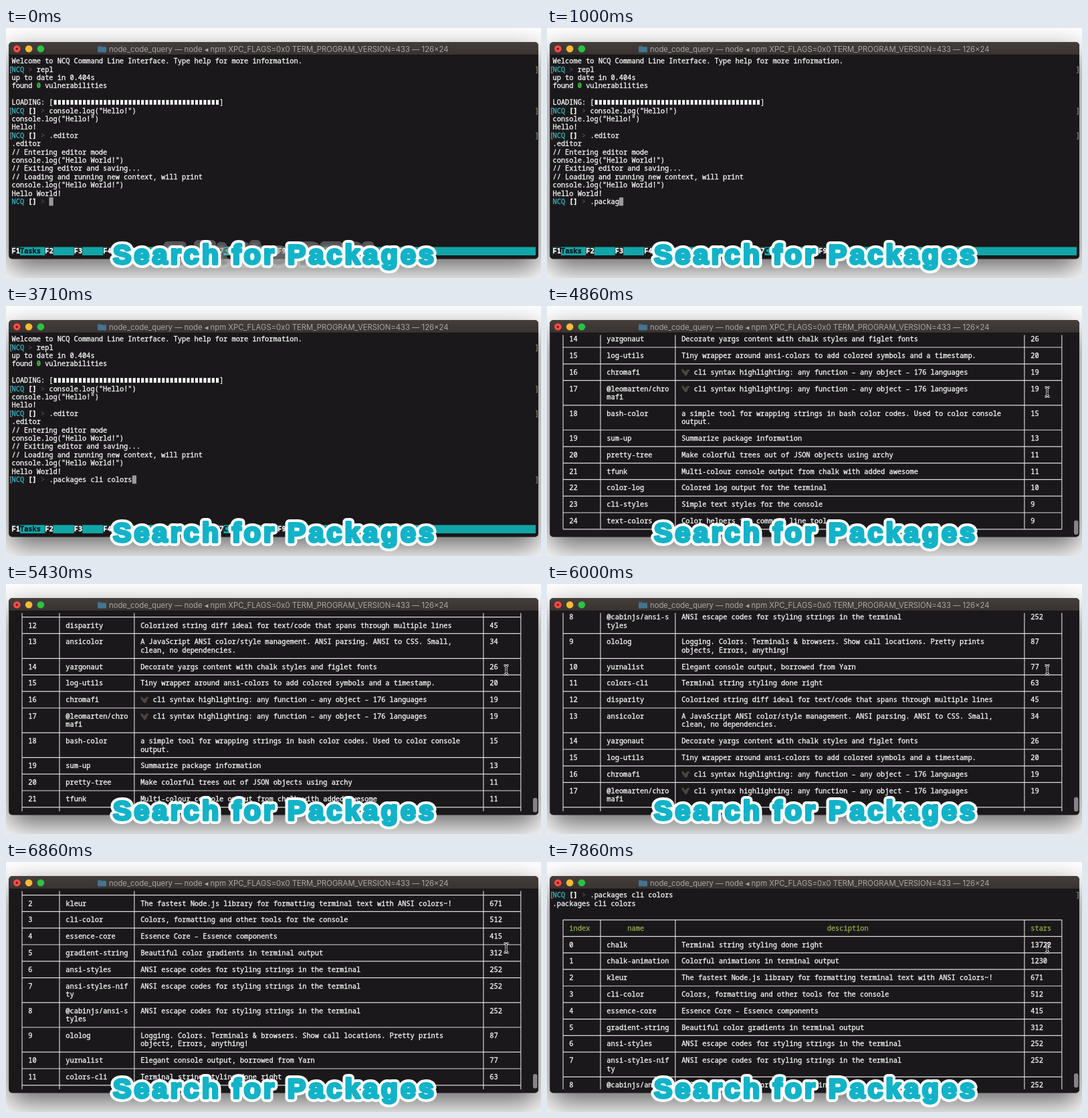
Recreate the animation shown at these times as an HTML page with a canvas. Size 800 px wide and 375 px high, loop 8 s.

```html
<!DOCTYPE html>
<html lang="en">
<head>
<meta charset="utf-8">
<title>Terminal package search</title>
<style>
  html, body { margin: 0; width: 100%; height: 100%; overflow: hidden; background: #fff; }
  canvas { display: block; }
</style>
</head>
<body>
<canvas id="stage" width="800" height="375"></canvas>
<script>
const ctx = document.getElementById('stage').getContext('2d');
const LOOP = 8000, FRAME = 1000 / 7;
const LEFT = 8.5, COL = 6.215, TOP = 49.6, ROW = 12.4, SCREEN_LINES = 24;
const WHITE = '#f8f8f8', CYAN = '#37b6c0', TEAL = '#12a5a8', DIM = '#4c4a4c', BACK = '#1a181a', GREEN = '#8fae4a';
const COMMAND = '.packages cli colors';
const BORDERS = [2, 11, 29, 113, 122].map(c => colX(c + 0.5));

// index order; "|" marks a wrapped line: name, description, stars
const PACKAGES = [
  ['chalk', 'Terminal string styling done right', 13722],
  ['chalk-animation', 'Colorful animations in terminal output', 1230],
  ['kleur', 'The fastest Node.js library for formatting terminal text with ANSI colors~!', 671],
  ['cli-color', 'Colors, formatting and other tools for the console', 512],
  ['essence-core', 'Essence Core – Essence components', 415],
  ['gradient-string', 'Beautiful color gradients in terminal output', 312],
  ['ansi-styles', 'ANSI escape codes for styling strings in the terminal', 252],
  ['ansi-styles-nif|ty', 'ANSI escape codes for styling strings in the terminal', 252],
  ['@cabinjs/ansi-s|tyles', 'ANSI escape codes for styling strings in the terminal', 252],
  ['ololog', 'Logging. Colors. Terminals & browsers. Show call locations. Pretty prints|objects, Errors, anything!', 87],
  ['yurnalist', 'Elegant console output, borrowed from Yarn', 77],
  ['colors-cli', 'Terminal string styling done right', 63],
  ['disparity', 'Colorized string diff ideal for text/code that spans through multiple lines', 45],
  ['ansicolor', 'A JavaScript ANSI color/style management. ANSI parsing. ANSI to CSS. Small,|clean, no dependencies.', 34],
  ['yargonaut', 'Decorate yargs content with chalk styles and figlet fonts', 26],
  ['log-utils', 'Tiny wrapper around ansi-colors to add colored symbols and a timestamp.', 20],
  ['chromafi', '   cli syntax highlighting: any function – any object – 176 languages', 19],
  ['@leomarten/chro|mafi', '   cli syntax highlighting: any function – any object – 176 languages', 19],
  ['bash-color', 'a simple tool for wrapping strings in bash color codes. Used to color console|output.', 15],
  ['sum-up', 'Summarize package information', 13],
  ['pretty-tree', 'Make colorful trees out of JSON objects using archy', 11],
  ['tfunk', 'Multi-colour console output from chalk with added awesome', 11],
  ['color-log', 'Colored log output for the terminal', 10],
  ['cli-styles', 'Simple text styles for the console', 9],
  ['text-colors', 'Color helpers for command line tools', 9],
];

function colX(col) { return LEFT + col * COL; }
function lineY(line) { return TOP + line * ROW; }

// The hairline stroke gives the text its medium weight.
function mono(text, col, line, color = WHITE, weight = 500) {
  ctx.font = `${weight} ${COL / 0.6}px "Noto Sans Mono", "DejaVu Sans Mono", monospace`;
  ctx.fillStyle = ctx.strokeStyle = color;
  ctx.lineWidth = 0.3;
  ctx.fillText(text, colX(col), lineY(line) + 3.5);
  ctx.strokeText(text, colX(col), lineY(line) + 3.5);
}

function box(x, y, w, h, color, radius = 0) {
  ctx.fillStyle = color;
  ctx.beginPath();
  ctx.roundRect(x, y, w, h, radius);
  ctx.fill();
}

function disc(x, y, r, color) { box(x - r, y - r, 2 * r, 2 * r, color, r); }

// Each screen line is a function that draws itself at a given line number.
const say = text => line => mono(text, 0, line);

function prompt(command, { marked = true, brackets = true, cursor = false } = {}) {
  return line => {
    const col = brackets ? 7 : 4;
    mono('NCQ', 0, line, CYAN);
    if (brackets) mono('[]', 4, line, '#fff', 700);
    mono('>', col, line, DIM);
    mono(command, col + 2, line);
    if (marked) {
      mono('[', -0.75, line, '#8a8a8a');
      mono(']', 125.9, line, '#8a8a8a');
    }
    if (cursor) box(colX(col + 2 + command.length), lineY(line) - 6.2, COL, ROW, '#9c9a9c');
  };
}

function loading(line) {
  mono('LOADING: [', 0, line);
  for (let i = 0; i < 40; i++) box(colX(10 + i) + 1, lineY(line) - 3.7, 4, 7.2, WHITE);
  mono(']', 50, line);
}

function verticals(line, from = -0.5, to = 0.5) {
  for (const x of BORDERS) box(x - 0.6, lineY(line + from), 1.2, (to - from) * ROW, '#d4d4d4');
}

function rule(from, to) {
  return line => {
    verticals(line, from, to);
    box(BORDERS[0], lineY(line) - 0.6, BORDERS[4] - BORDERS[0], 1.2, '#dedede');
  };
}

function cells(texts, color) {
  return line => {
    verticals(line);
    for (const [col, text] of texts) mono(text, col, line, color);
  };
}

function chipmunk(line) {
  ctx.fillStyle = '#4d4643';
  for (const [x, y, rx, ry, turn] of [[204, -1, 1.7, 4, -0.5], [208, 1.5, 2.6, 3.8, 0.4], [211, -2.5, 2.2, 1.8, 0]]) {
    ctx.beginPath();
    ctx.ellipse(x, lineY(line) + y, rx, ry, turn, 0, 7);
    ctx.fill();
  }
}

function tableLines() {
  const lines = [rule(0, 0.5), cells([[4, 'index'], [18, 'name'], [66, 'desciption'], [115, 'stars']], GREEN)];
  PACKAGES.forEach(([name, about, stars], index) => {
    const names = name.split('|'), abouts = about.split('|');
    lines.push(rule());
    for (let i = 0; i < Math.max(names.length, abouts.length); i++) {
      const draw = cells([
        [4, i ? '' : index], [13, names[i] || ''], [31, abouts[i] || ''], [115, i ? '' : stars],
      ]);
      const hasIcon = !i && about.startsWith(' ');
      lines.push(line => { draw(line); if (hasIcon) chipmunk(line); });
    }
  });
  return [...lines, rule(-0.5, 0)];
}

const session = [
  say('Welcome to NCQ Command Line Interface. Type help for more information.'),
  prompt('repl', { brackets: false }),
  say('up to date in 0.404s'),
  line => { say('found   vulnerabilities')(line); mono('0', 6, line, '#3fc23f', 700); },
  say(''),
  loading,
  prompt('console.log("Hello!")'),
  say('console.log("Hello!")'),
  say('Hello!'),
  prompt('.editor'),
  say('.editor'),
  say('// Entering editor mode'),
  say('console.log("Hello World!")'),
  say('// Exiting editor and saving...'),
  say('// Loading and running new context, will print'),
  say('console.log("Hello World!")'),
  say('Hello World!'),
];
const results = [
  prompt(COMMAND), say(COMMAND), say(''), ...tableLines(), say(''),
  prompt('', { marked: false, cursor: true }),
];
const LAST_SCROLL = results.length - SCREEN_LINES + 1;

// Piecewise linear value through [time, value] points.
function track(t, points) {
  if (t <= points[0][0]) return points[0][1];
  for (let i = 1; i < points.length; i++) {
    const [t0, v0] = points[i - 1], [t1, v1] = points[i];
    if (t <= t1) return v0 + (v1 - v0) * (t - t0) / (t1 - t0);
  }
  return points.at(-1)[1];
}

function drawWindow() {
  ctx.fillStyle = '#fff';
  ctx.fillRect(0, 0, 800, 375);
  ctx.save();
  ctx.shadowColor = 'rgba(0,0,0,.6)';
  ctx.shadowBlur = 42;
  ctx.shadowOffsetY = 15;
  box(4.2, 21.2, 791.8, 325.2, BACK, 5);
  ctx.restore();
  const bar = ctx.createLinearGradient(0, 21, 0, 41);
  bar.addColorStop(0, '#453e3b');
  bar.addColorStop(1, '#383230');
  box(4.2, 21.2, 791.8, 19.6, bar, [5, 5, 0, 0]);
  box(4.2, 40.3, 791.8, 0.8, '#0c0b0c');
  ['#fc4c48', '#f5bb35', '#2ac440'].forEach((color, i) => disc(16.3 + 17.8 * i, 31.2, 5.3, color));
  disc(16.3, 31.2, 1.7, '#7c0f0c');
  box(137, 26.8, 6, 4, '#3a627a', 1);
  box(137, 28.2, 13, 8.3, '#44748f', 1);
  ctx.font = '11.3px Inter, sans-serif';
  ctx.fillStyle = '#aaa7a6';
  ctx.fillText('node_code_query — node ◂ npm XPC_FLAGS=0x0 TERM_PROGRAM_VERSION=433 — 126×24', 154, 35.6);
}

function drawStatusBar() {
  const line = SCREEN_LINES - 1;
  box(LEFT, lineY(line) - 6.2, 783.5, ROW, TEAL);
  [0, 8, 15, 22, 29, 36, 49, 57, 64].forEach((col, i) => {
    box(colX(col), lineY(line) - 6.2, 2 * COL, ROW, BACK);
    mono('F' + (i + 1), col, line, '#fff', 700);
  });
  mono('Tasks', 2, line, '#0b1718', 700);
  mono('Clear', 51, line, '#0b1718', 700);
}

function drawPointer(x, y) {
  const shape = new Path2D(`M${x - 3.5} ${y - 7}q3.5 0 3.5 2.5v9q0 2.5 -3.5 2.5M${x + 3.5} ${y - 7}q-3.5 0 -3.5 2.5v9q0 2.5 3.5 2.5M${x - 2} ${y + 2}h4`);
  for (const [width, color] of [[3.2, '#f4f4f4'], [1, '#111']]) {
    ctx.lineWidth = width;
    ctx.strokeStyle = color;
    ctx.stroke(shape);
  }
}

function drawCaption(text, fill, edge, alpha = 1) {
  ctx.save();
  ctx.globalAlpha = alpha;
  ctx.font = 'bold 41px "Liberation Sans", Arial, sans-serif';
  ctx.letterSpacing = '4.25px';
  ctx.textAlign = 'center';
  ctx.lineJoin = 'round';
  for (const [width, color] of [[12, edge], [3.8, fill]]) {
    ctx.lineWidth = width;
    ctx.strokeStyle = color;
    ctx.strokeText(text, 402, 354);
  }
  ctx.fillStyle = fill;
  ctx.fillText(text, 402, 354);
  ctx.restore();
}

function draw(time) {
  const step = Math.floor((time % LOOP + 3) / FRAME), t = step * FRAME;
  const listed = t >= 4000, entered = t > 3100;
  const scroll = listed ? Math.round(track(t, [
    [4571, LAST_SCROLL], [5429, 32], [6000, 23], [6857, 9], [7857, 0],
  ])) : 0;
  const typed = Math.round(track(t, [[0, 0], [2143, 16], [2286, 16], [2429, 17], [3000, 20]]));
  const lines = listed
    ? results.slice(scroll, scroll + SCREEN_LINES)
    : [...session, prompt(COMMAND.slice(0, typed), { marked: entered, cursor: true })];

  drawWindow();
  lines.forEach((drawLine, line) => drawLine(line));
  if (!listed || scroll === LAST_SCROLL) drawStatusBar();
  if (t > 4200) {
    box(788, 317 + scroll * 0.12, 6.5, 21.5, '#858385', 3.2);
    drawPointer(748, 129);
  }
  if (step === 0) drawCaption('Edit the REPL', '#777', '#ddd', 0.3);
  drawCaption('Search for Packages', '#12b3c8', '#fff');
}

const start = performance.now();
function tick() {
  draw(performance.now() - start);
  requestAnimationFrame(tick);
}
tick();
</script>
</body>
</html>
```
